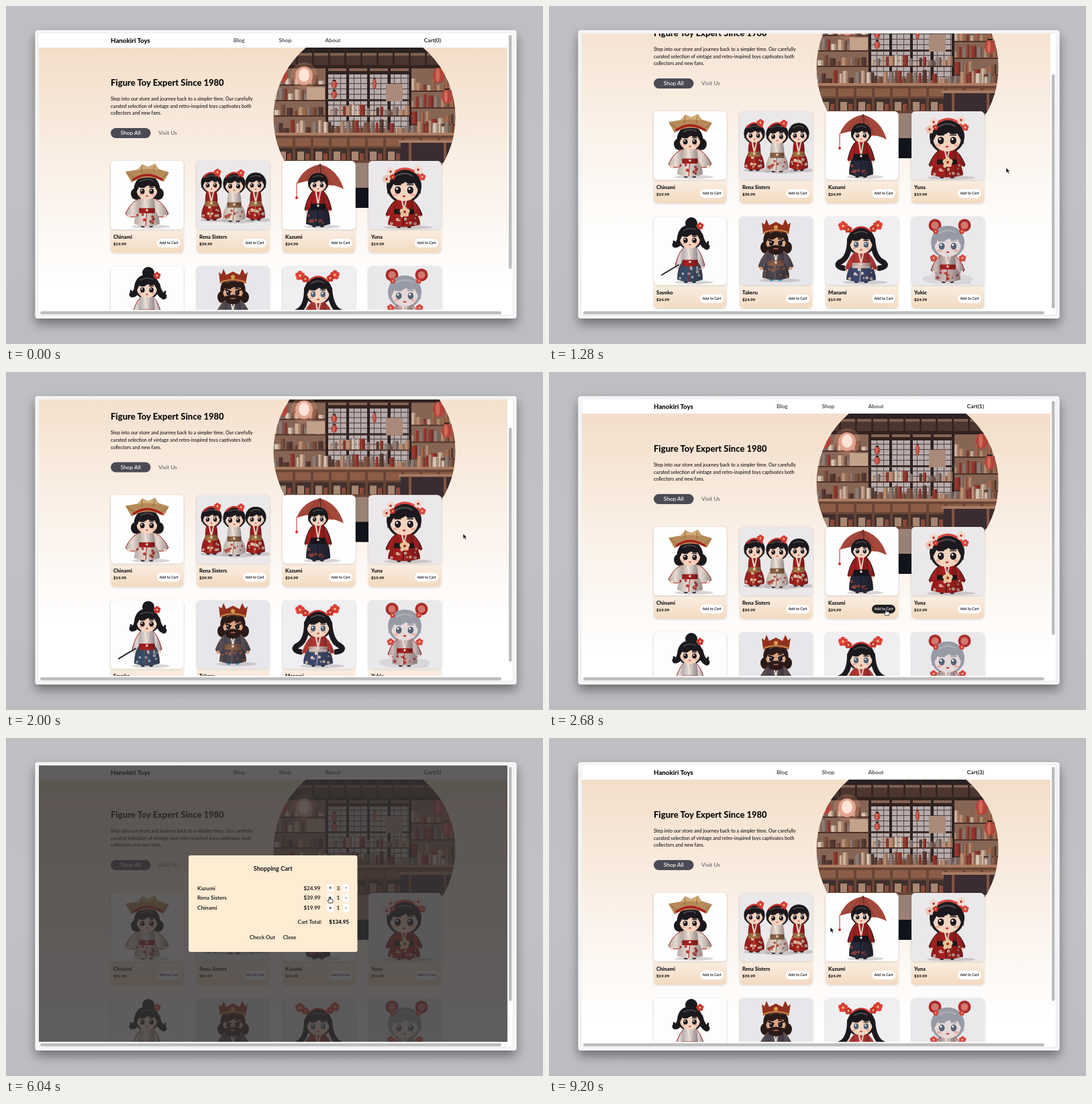
Write an HTML page that moves like this. It is 800x504 px and loops after 9.61 s.

```html
<!DOCTYPE html>
<html lang="en">
<head>
<meta charset="utf-8">
<title>Toy shop</title>
<style>
html, body { margin: 0; width: 100%; height: 100%; overflow: hidden; background: #bfc0c4; }
svg { display: block; width: 100vw; height: 100vh; }
text { font-family: Lato, "Open Sans", sans-serif; white-space: pre; }
</style>
</head>
<body>
<svg id="stage" viewBox="0 0 800 504"></svg>
<script>
const LOOP = 9610;
const MAX_SCROLL = 70;
const INK = '#1b191d';

// ---------- drawing helpers ----------
const rect = (x, y, w, h, fill, r = 0, more = '') =>
  `<rect x="${x}" y="${y}" width="${w}" height="${h}" rx="${r}" fill="${fill}" ${more}/>`;
const oval = (x, y, rx, ry, fill, more = '') =>
  `<ellipse cx="${x}" cy="${y}" rx="${rx}" ry="${ry}" fill="${fill}" ${more}/>`;
const dot = (x, y, r, fill, more) => oval(x, y, r, r, fill, more);
const path = (d, fill, more = '') => `<path d="${d}" fill="${fill}" ${more}/>`;
const text = (x, y, size, weight, str, fill = '#080808', anchor = 'start') =>
  `<text x="${x}" y="${y}" font-size="${size}" font-weight="${weight}" fill="${fill}" text-anchor="${anchor}">${str}</text>`;

function random(seed) {
  return () => (seed = (seed * 16807) % 2147483647) / 2147483647;
}

function flower(x, y, r, fill, core = '#f0c58a') {
  let out = '';
  for (let i = 0; i < 5; i++) {
    const a = i * Math.PI * 0.4 - 1.57;
    out += dot(x + Math.cos(a) * r * 0.6, y + Math.sin(a) * r * 0.6, r * 0.5, fill);
  }
  return out + dot(x, y, r * 0.28, core);
}

// One figure: x, y, r place the head; w is the half width of the hem, b its foot.
function doll(o) {
  const { x, y, r, robe, sash, w, b = 95, sleeve = 0, hair = INK,
          skin = '#f4d3bf', trim = '#f4e6da', spot = '#f2d9c4', back = '', top = '' } = o;
  const p = (dx, dy) => `${x + dx * r} ${y + dy * r}`;
  const neck = y + r * 0.85, waist = neck + (b - neck) * 0.42, chest = w * 0.62;
  const rnd = random(Math.round(x * 97 + y));
  let out = oval(x + 6, b, w * 1.5, 3, '#8c8688', 'opacity=".35"') + back;
  out += oval(x, y + r * 0.06, r * 1.04, r * 1.02, hair);
  for (const s of [-1, 1]) {
    out += rect(x + s * w * 0.32 - 3, b - 5, 6, 6, o.shoe || '#2b2830', 2);
    if (sleeve) {
      const arm = `M${x + s * r * 0.3} ${neck - 1} Q${x + s * sleeve * 0.7} ${neck + 2} ${x + s * sleeve} ${waist + 5}
        Q${x + s * sleeve * 0.85} ${waist + 13} ${x + s * chest} ${waist + 9}L${x + s * chest * 0.8} ${waist - 4}Z`;
      out += path(arm, robe, `stroke="${sash}" stroke-width="1"`) + path(arm, 'url(#shade)');
      out += dot(x + s * sleeve * 0.85, waist + 9, 2.4, skin);
    }
  }
  const skirt = `M${x - chest} ${waist} Q${x - w} ${waist + 9} ${x - w} ${b - 4} Q${x} ${b + 3} ${x + w} ${b - 4}
    Q${x + w} ${waist + 9} ${x + chest} ${waist}Z`;
  const torso = `M${x - r * 0.35} ${neck - 3} Q${x - chest} ${neck} ${x - chest} ${waist + 1}
    L${x + chest} ${waist + 1} Q${x + chest} ${neck} ${x + r * 0.35} ${neck - 3}Z`;
  out += path(skirt, o.skirt || robe) + path(torso, robe);
  for (let i = 0; i < 11; i++) {
    out += flower(x + (rnd() - 0.5) * w * 1.7, waist + 5 + rnd() * (b - waist - 10), 1.1 + rnd() * 1.4, spot, sash);
  }
  out += path(`M${x} ${waist} L${x - 2} ${b - 1}`, 'none', `stroke="${sash}" stroke-width="1"`);
  out += path(`M${x - 4} ${neck - 2} L${x} ${waist - 2} L${x + 4} ${neck - 2}`, 'none', `stroke="${trim}" stroke-width="2"`);
  out += rect(x - chest, waist - 3, chest * 2, Math.max(5, (b - neck) * 0.18), sash, 1);
  out += dot(x, waist, 1.8, trim) + path(skirt, 'url(#shade)') + path(torso, 'url(#shade)');
  out += oval(x, y + r * 0.2, r * 0.83, r * 0.76, skin);
  for (const s of [-1, 1]) {
    const ex = x + s * r * 0.37, ey = y + r * 0.3;
    out += oval(ex, ey, r * 0.22, r * 0.23, '#fff') + oval(ex, ey, r * 0.19, r * 0.22, o.iris || '#21171a');
    out += dot(ex - r * 0.05, ey - r * 0.08, r * 0.06, '#fff');
    out += path(`M${ex - r * 0.2} ${ey - r * 0.32} L${ex + r * 0.2} ${ey - r * 0.32}`, 'none', `stroke="${hair}" stroke-width="${r * 0.06}"`);
    out += oval(x + s * r * 0.53, y + r * 0.58, r * 0.14, r * 0.08, '#e89a88', 'opacity=".6"');
  }
  out += oval(x, y + r * 0.67, r * 0.1, r * 0.05, '#b8342f');
  out += path(`M${p(-0.98, 0.55)} Q${p(-1.15, -0.95)} ${p(0, -0.97)} Q${p(1.15, -0.95)} ${p(0.98, 0.55)}
    Q${p(0.72, 0.1)} ${p(0.62, -0.12)} Q${p(0.2, 0.02)} ${p(0.1, -0.2)} Q${p(-0.2, 0.05)} ${p(-0.64, -0.05)}
    Q${p(-0.75, 0.2)} ${p(-0.98, 0.55)}Z`, hair);
  out += path(`M${p(-0.55, -0.5)} Q${p(0, -0.85)} ${p(0.5, -0.55)}`, 'none',
    `stroke="#fff" stroke-width="${r * 0.1}" opacity=".2"`);
  return out + top;
}

const RED = '#a8211f', CREAM = '#e6d9d0';
const line = (d, color, width) => path(d, 'none', `stroke="${color}" stroke-width="${width}" stroke-linecap="round"`);
const band = (x, y, w) => line(`M${x - w} ${y + 4} Q${x} ${y - 9} ${x + w} ${y + 4}`, '#c2322c', 2.5);

const figures = [
  () => doll({ x: 54, y: 40, r: 18.5, robe: CREAM, sash: RED, w: 19, b: 98, sleeve: 32, spot: '#b8443b',
    back: oval(38, 49, 8, 9, INK) + oval(71, 49, 8, 9, INK),
    top: path('M22 16 L40 13 L47 5 L56 9 L66 4 L71 12 L87 17 L79 31 Q54 18 31 32Z', '#b58a58') +
      path('M40 14 L47 5 L56 9 L66 4 L70 14 Q55 10 40 14Z', '#d0ab78') +
      line('M24 18 L38 27 M85 19 L74 27 M47 7 L46 17 M65 7 L64 17', '#80572f', 0.8) +
      line('M34 28 Q54 14 76 28', RED, 3.4) }),
  () => doll({ x: 22, y: 32, r: 15, robe: RED, sash: '#a97a45', w: 15, b: 88, top: band(22, 20, 11) + flower(31, 17, 5, '#d83c35') }) +
    doll({ x: 88, y: 32, r: 15, robe: RED, sash: '#a97a45', w: 14, b: 88 }) +
    doll({ x: 56, y: 33, r: 16, robe: CREAM, sash: '#8f6647', w: 17, b: 90, spot: '#c05247',
      top: band(56, 20, 12) + flower(66, 18, 5, '#d83c35') }),
  () => doll({ x: 53, y: 32, r: 14.5, robe: RED, skirt: '#272a3b', sash: '#17161d', w: 18, b: 98, sleeve: 20, spot: '#a8473f',
    back: path('M21 34 Q30 10 56 5 Q82 12 91 42 Q76 34 66 37 Q50 24 21 34Z', '#a5483c') +
      [30, 45, 60, 74].map(x => line(`M56 5 L${x} ${x < 50 ? 31 : 37}`, '#6f221f', 0.7)).join('') +
      line('M21 33 V55', '#c62a26', 1) + dot(21, 55, 2, '#c62a26') + line('M56 5 L62 75', '#50302a', 1.5) }),
  () => doll({ x: 53, y: 36, r: 25, robe: RED, sash: '#1e191b', w: 24, b: 99, sleeve: 27,
    top: line('M33 22 Q54 1 76 22', '#d84b43', 3.2) + flower(33, 16, 6, '#f1d8cb', RED) +
      flower(27, 27, 6, '#e9c6b7', RED) + flower(36, 24, 4, '#c9332d') + flower(74, 13, 6, '#f1d8cb', RED) +
      flower(80, 24, 5, '#d8473f') + flower(54, 76, 7, '#e8c398', RED) }),
  () => doll({ x: 54, y: 30, r: 18, robe: '#ded6d4', skirt: '#3a506b', sash: RED, w: 19, b: 98, sleeve: 22, spot: '#cbd2dc',
    back: dot(56, 10, 9, INK) + line('M40 30 Q38 42 32 42 M69 28 Q72 42 79 45', INK, 9) + line('M33 43 L30 37 M79 46 L81 38', INK, 3),
    top: flower(69, 14, 5, '#c93630') + line('M37 72 L12 87', '#24232b', 2) }),
  () => doll({ x: 54, y: 34, r: 18, robe: '#565059', skirt: '#484650', sash: '#8b6048', w: 20, b: 95, sleeve: 26, hair: '#2a1b18',
    skin: '#d9a27f', spot: '#96604c', shoe: '#2a97b3',
    back: oval(38, 46, 7, 9, '#2a1b18') + oval(71, 46, 7, 9, '#2a1b18'),
    top: path('M42 45 Q54 40 67 45 L64 54 Q54 60 44 54Z', '#2a1b18') + oval(54, 48, 4, 1, '#a6614f') +
      line('M43 35 L51 38 M66 35 L58 38', '#241513', 2) +
      path('M35 26 L33 9 L37 12 L40 4 L44 13 L54 8 L64 13 L68 4 L72 12 L76 9 L73 26 Q54 18 35 26Z', '#92301f') +
      line('M36 24 Q54 16 73 24', '#c28a46', 2) + dot(54, 16, 3, '#d5a04d') }),
  () => doll({ x: 53, y: 36, r: 20, robe: '#bb3a36', skirt: '#3e4c70', sash: '#d8c3b9', w: 22, b: 98, sleeve: 24, iris: '#54606f',
    back: line('M36 34 Q36 62 21 68 Q14 74 27 77 M70 34 Q72 62 86 68 Q94 74 80 77', INK, 8),
    top: band(53, 18, 14) + flower(26, 14, 6.5, '#dc4138') + flower(34, 19, 5, '#c7342d') +
      flower(78, 13, 6.5, '#dc4138') + flower(71, 18, 5, '#c7342d') }),
  () => doll({ x: 54, y: 37, r: 24, robe: '#cdbab8', sash: RED, w: 19, b: 98, sleeve: 25, hair: '#989ba5', skin: '#e6d8d7', iris: '#596475', spot: '#b94742',
    back: oval(54, 93, 38, 8, '#dad7da') + [35, 79].map(x => dot(x, 13, 9.5, '#a92d2b') + dot(x, 13, 5.5, '#d4776f')).join(''),
    top: flower(36, 22, 4, '#cf423c') + flower(75, 22, 4, '#cf423c') + flower(33, 62, 5, '#d44a43') + flower(76, 62, 5, '#d44a43') })
];

const goods = [
  ['Chinami', '19.99', '#fefefe'], ['Rena Sisters', '39.99', '#ebe8e9'],
  ['Kazumi', '24.99', '#fefefe'], ['Yuna', '19.99', '#ebe8eb'],
  ['Sayoko', '24.99', '#fdfdfd'], ['Takeru', '24.99', '#e7e6ea'],
  ['Manami', '19.99', '#efeef0'], ['Yukie', '24.99', '#e9e9ec']
];
const cardAt = i => [156 + (i % 4) * 128, i < 4 ? 231 : 388];

function card([name, price, tone], i) {
  const [x, y] = cardAt(i);
  return `<g transform="translate(${x} ${y})">` +
    rect(0, 0, 108.5, 137, 'url(#cardFill)', 6, 'filter="url(#soft)"') +
    rect(0, 0, 108.5, 102, tone, 6, 'filter="url(#soft)"') + `<g clip-path="url(#frame)">${figures[i]()}</g>` +
    text(4, 115.5, 7.6, 800, name) + text(4, 126, 6.2, 800, '$' + price) +
    rect(69, 116, 35, 13, '#fff', 6.5, 'class="pill"') +
    `<g class="label">${text(86.5, 124.4, 5.5, 600, 'Add to Cart', 'currentColor', 'middle')}</g></g>`;
}

function shopScene() {
  const rnd = random(41);
  const tones = ['#b98d72', '#7d5140', '#cfae96', '#94382f', '#563a33', '#d9c4b2', '#a3684c', '#8d7b74'];
  const clutter = (x0, x1, base, tall) => {
    let out = rect(x0, base, x1 - x0, 2, '#4d3029');
    for (let x = x0; x < x1 - 4;) {
      const w = 3 + rnd() * 6, h = tall * (0.35 + rnd() * 0.65);
      const tone = tones[Math.floor(rnd() * tones.length)];
      out += rect(x, base - h, w, h, tone, 1) + rect(x + w * 0.6, base - h, w * 0.4, h, '#2b1c18', 1, 'opacity=".3"');
      x += w + rnd() * 3;
    }
    return out;
  };
  let out = rect(398, 31, 272, 270, '#866555') + rect(398, 31, 272, 62, '#4b3730');
  out += rect(398, 62, 272, 8, '#2a2223') + rect(398, 70, 272, 4, '#80604f') + rect(398, 88, 272, 5, '#32231f');
  for (let x = 408; x < 670; x += 24) out += rect(x, 62, 3, 28, '#35251f');
  // lattice window with a shelf before its lower half
  out += rect(478, 100, 124, 82, '#b7acab');
  for (let y = 107; y < 182; y += 8) out += rect(478, y, 124, 1.2, '#574a49');
  for (let x = 478; x < 604; x += 10) out += rect(x, 98, 1, 84, '#574a49');
  for (let x = 476; x < 606; x += 31) out += rect(x, 93, 4, 92, '#2c2122');
  out += rect(476, 97, 128, 5, '#33231f') + rect(476, 139, 128, 3, '#3a2a26');
  for (const [x0, x1, y, h] of [[400, 476, 117, 15], [400, 476, 140, 18], [400, 476, 163, 18], [604, 669, 126, 22],
    [604, 669, 151, 20], [480, 604, 163, 16], [604, 669, 176, 20], [398, 669, 190, 22]]) out += clutter(x0, x1, y, h);
  out += rect(448, 121, 27, 19, '#c2a28b', 1) + rect(566, 116, 25, 26, '#a9897a', 1);
  // counters
  out += rect(398, 189, 272, 4, '#ad7c61') + rect(398, 193, 272, 48, '#694536');
  for (let x = 404; x < 660; x += 27) {
    out += rect(x, 197, 23, 12, '#8b5d46') + rect(x, 212, 23, 18, '#40302c') + rect(x + 3, 217, 10, 13, '#a78672') + rect(x + 15, 220, 6, 10, '#8a4a3b');
  }
  out += rect(585, 200, 85, 4, '#a97a63') + rect(588, 204, 78, 30, '#3a2c31') + rect(600, 204, 4, 30, '#805542') + rect(652, 204, 4, 30, '#805542');
  out += rect(398, 234, 272, 40, '#9a8175') + rect(398, 271, 272, 30, '#11131b');
  for (const [x, y, w, h] of [[412, 103, 8, 11], [489, 117, 4.5, 6], [489, 132, 4.5, 6], [645, 103, 9, 12], [657, 135, 8, 11], [549, 116, 3, 8]])
    out += oval(x, y, w, h, '#b1443a') + oval(x - w * 0.2, y, w * 0.35, h * 0.85, '#cf6a58') + rect(x - w / 2, y - h - 1, w, 2, '#30201d');
  out += dot(444, 104, 20, '#f4a486', 'opacity=".22"') + oval(444, 104, 13, 14, '#e3a48f') + oval(444, 103, 8, 10, '#ffe3d6');
  return `<g clip-path="url(#round)">${out}</g>`;
}

function page() {
  return rect(49, -60, 698, 720, 'url(#pageFill)') + shopScene() + rect(49, 20, 698, 42, '#fff') +
    text(156, 54.7, 9.7, 800, 'Hanokiri Toys') +
    text(339, 54, 8.4, 600, 'Blog', '#3d3d40') + text(406.5, 54, 8.4, 600, 'Shop', '#3d3d40') +
    text(475.5, 54, 8.4, 600, 'About', '#3d3d40') +
    `<g id="count">${text(648, 54, 8.4, 600, 'Cart(0)', '#080808', 'end')}</g>` +
    text(156, 118.6, 13, 800, 'Figure Toy Expert Since 1980') +
    ['Step into our store and journey back to a simpler time. Our carefully',
     'curated selection of vintage and retro-inspired toys captivates both',
     'collectors and new fans.'].map((s, i) => text(156, 141 + i * 10.6, 7.13, 500, s, '#111')).join('') +
    rect(156, 182, 59.5, 15, '#4b4a54', 7.5) + text(185.7, 192.3, 8.3, 500, 'Shop All', '#fff', 'middle') +
    text(227, 192.3, 8.3, 500, 'Visit Us', '#626167') + goods.map(card).join('');
}

const stage = document.getElementById('stage');
stage.innerHTML = `<defs>
  <linearGradient id="wall" x2="0" y2="1"><stop stop-color="#bebfc3"/><stop offset=".5" stop-color="#c1c2c6"/><stop offset="1" stop-color="#bcbdc1"/></linearGradient>
  <linearGradient id="pageFill" gradientUnits="userSpaceOnUse" x1="0" y1="62" x2="0" y2="420">
    <stop stop-color="#f3dec9"/><stop offset=".5" stop-color="#faf0e6"/><stop offset="1" stop-color="#fff"/></linearGradient>
  <linearGradient id="cardFill" x2="0" y2="1"><stop offset=".72" stop-color="#fbf0e5"/><stop offset="1" stop-color="#f2dac1"/></linearGradient>
  <linearGradient id="shade"><stop stop-color="#180b10" stop-opacity=".22"/><stop offset=".4" stop-color="#180b10" stop-opacity="0"/><stop offset="1" stop-color="#180b10" stop-opacity=".38"/></linearGradient>
  <filter id="soft" x="-10%" y="-10%" width="120%" height="125%"><feDropShadow dx="0" dy="1" stdDeviation="1.5" flood-opacity=".14"/></filter>
  <filter id="deep" x="-10%" y="-10%" width="120%" height="125%"><feDropShadow dx="0" dy="8" stdDeviation="8" flood-opacity=".42"/></filter>
  <clipPath id="view"><rect x="49" y="41" width="698" height="412"/></clipPath>
  <clipPath id="frame"><rect width="108.5" height="102" rx="6"/></clipPath>
  <clipPath id="round"><circle cx="534" cy="166" r="135.5"/></clipPath></defs>` +
  rect(0, 0, 800, 504, 'url(#wall)') + rect(43.5, 36, 717, 430, '#f5f6f6', 4, 'filter="url(#deep)"') +
  rect(48, 40, 707.5, 421, '#fff', 1, 'stroke="#e3e3e4" stroke-width=".7"') +
  `<g clip-path="url(#view)"><g id="page">${page()}</g>
   <g id="dialog">${rect(49, 41, 698, 412, '#323030', 0, 'opacity=".78"')}<g id="box"></g></g></g>` +
  rect(749, 43, 4.5, 349, '#bcbcbd', 2.2, 'id="thumb"') + rect(51, 455.3, 687, 4.4, '#bcbcbd', 2.2) +
  `<g id="cursor"><g id="arrow">${path('M0 0 V8 L1.9 6.3 L3.2 9.2 L4.6 8.6 L3.3 5.8 H5.8Z', '#000', 'stroke="#fff" stroke-width=".7"')}</g>
   <g id="hand">${path('M-.9 .5 Q0 -.7 .8 .5 V3.4 Q2 2.6 2.5 3.6 Q3.5 3 4 4 Q5.2 3.8 5.2 5 Q5.2 7.5 4.2 9 H-.9 Q-2 7 -3.1 5.6 Q-3 4.3 -.9 5.3Z', '#fff', 'stroke="#000" stroke-width=".8"')}</g></g>`;

const el = id => document.getElementById(id);
const pills = [...stage.querySelectorAll('.pill')], labels = [...stage.querySelectorAll('.label')];
const countText = el('count').firstChild;
const show = (node, on) => node.setAttribute('visibility', on ? 'visible' : 'hidden');

// ---------- timeline ----------
const clamp = v => Math.max(0, Math.min(1, v));
const smooth = v => v * v * (3 - 2 * v);

function track(keys, t) {
  let prev = keys[0];
  for (const key of keys) {
    if (t < key[0]) {
      const k = smooth(clamp((t - prev[0]) / (key[0] - prev[0])));
      return prev.slice(1).map((v, i) => v + (key[i + 1] - v) * k);
    }
    prev = key;
  }
  return prev.slice(1);
}

const scrollKeys = [[1080, 0], [1280, 74], [1480, MAX_SCROLL], [1880, MAX_SCROLL], [2200, 0]];
const cursorKeys = [[160, 626, 458], [440, 684, 278], [760, 684, 278], [880, 681, 241], [2200, 681, 241],
  [2520, 502, 354], [2960, 502, 354], [3200, 372, 354], [3400, 372, 354], [3600, 243, 354], [3760, 243, 354],
  [4040, 632, 47], [4480, 632, 47], [4960, 483, 222], [5760, 483, 222], [5960, 482, 237], [6280, 482, 237],
  [6440, 506, 222], [7280, 506, 222], [7480, 506, 252], [7800, 506, 252], [8160, 382, 283], [8280, 382, 283], [8560, 419, 282]];

// time, cart line, change
const clicks = [[2600, 0, 1], [3280, 1, 1], [3680, 2, 1], [5240, 0, 1], [5480, 0, 1], [6080, 1, 1],
  [6560, 0, -1], [6800, 0, -1], [7640, 2, -1]];
const lines = [goods[2], goods[1], goods[0]];
const OPEN = 4160, CLOSE = 8800;

function cartBox(qty) {
  const rows = lines.map((item, i) => [item, qty[i]]).filter(row => row[1] > 0);
  const h = 99 + rows.length * 15, top = 247 - h / 2;
  const total = rows.reduce((sum, [item, n]) => sum + item[1] * n, 0).toFixed(2);
  let y = top + 51.5;
  let out = rect(272, top, 251.5, h, '#feecd3', 3) + text(397.7, top + 23, 9.2, 700, 'Shopping Cart', '#171515', 'middle');
  for (const [[name, price], n] of rows) {
    out += text(285, y, 8.2, 600, name) + text(468.5, y, 8, 600, '$' + price, '#080808', 'end') +
      rect(478.5, y - 8.5, 9.5, 11.5, '#fff') + rect(501.7, y - 8.5, 9.5, 11.5, '#fff') +
      text(483.2, y - 0.2, 7.5, 700, '+', '#080808', 'middle') + text(494.8, y, 8, 600, n, '#080808', 'middle') +
      text(506.4, y - 0.2, 7.5, 700, '-', '#080808', 'middle');
    y += 14.8;
  }
  return out + text(511, top + h - 42, 8, 600, `Cart Total:<tspan dx="10.5" font-weight="800">$${total}</tspan>`, '#080808', 'end') +
    text(363, top + h - 18.8, 8, 600, 'Check Out') + text(412.7, top + h - 18.8, 8, 600, 'Close');
}

let drawn = '';
function render(t) {
  const [scroll] = track(scrollKeys, t);
  const [x, y] = track(cursorKeys, t);
  const open = t >= OPEN && t < CLOSE;
  const qty = [0, 0, 0];
  for (const [time, i, change] of clicks) if (t >= time) qty[i] += change;

  el('page').setAttribute('transform', `translate(0 ${-scroll})`);
  el('thumb').setAttribute('y', 43 + Math.min(scroll, MAX_SCROLL) / MAX_SCROLL * 59);
  countText.textContent = `Cart(${qty[0] + qty[1] + qty[2]})`;
  show(el('dialog'), open);
  const key = qty.join();
  if (open && key !== drawn) {
    el('box').innerHTML = cartBox(qty);
    drawn = key;
  }

  let hand = false;
  goods.forEach((_, i) => {
    const [cx, cy] = cardAt(i);
    const dx = x - cx, dy = y + scroll - cy;
    const over = !open && t >= 160 && dx > 69 && dx < 104 && dy > 116 && dy < 129;
    hand = hand || over;
    pills[i].setAttribute('fill', over ? '#222123' : '#fff');
    labels[i].setAttribute('color', over ? '#fff' : '#0c0c0c');
  });
  if (open) {
    const onStep = y > 217 && y < 260 && ((x > 478 && x < 489) || (x > 501 && x < 512));
    hand = onStep || (y > 279 && y < 300 && x > 362 && x < 434);
  }
  el('cursor').setAttribute('transform', `translate(${x} ${y})`);
  show(el('arrow'), t >= 160 && !hand);
  show(el('hand'), t >= 160 && hand);
}

const start = performance.now();
function tick() {
  render((performance.now() - start) % LOOP);
  requestAnimationFrame(tick);
}
tick();
</script>
</body>
</html>
```
